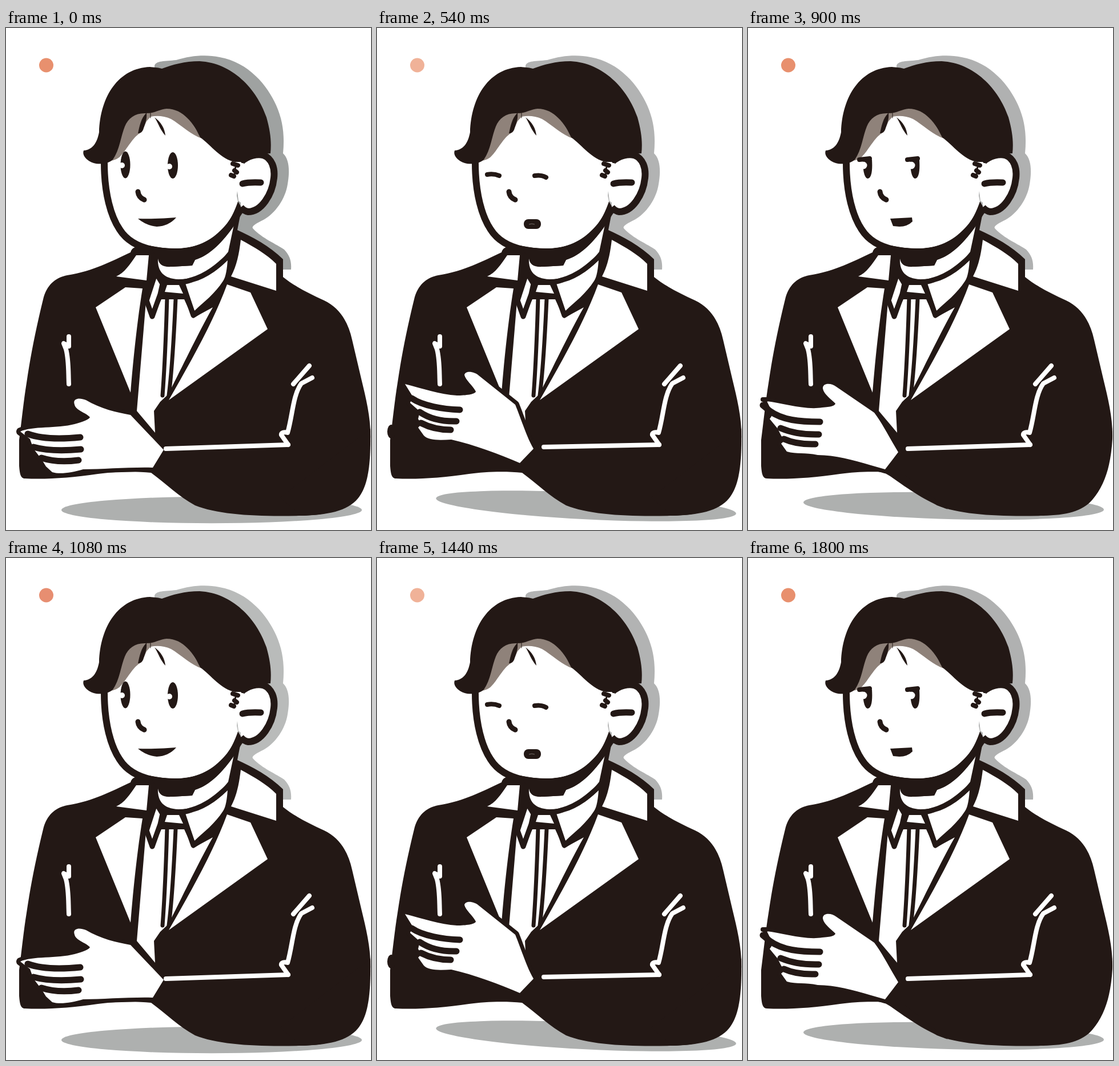
These frames come from a looping animation (639 px wide and 877 px high, 1980 ms). An HTML page:

```html
<!DOCTYPE html>
<html lang="en">
<head>
<meta charset="utf-8">
<title>Man with folded arms</title>
<style>
  html, body { margin: 0; width: 100%; height: 100%; overflow: hidden; background: #fff; }
  svg { display: block; width: 100%; height: 100%; }
  .k { fill: #231815; }
  .w { fill: #fff; }
  .l { fill: none; stroke: #231815; stroke-linecap: round; stroke-linejoin: round; }
  .c { fill: none; stroke: #fff; stroke-width: 8; stroke-linecap: round; stroke-linejoin: round; }
  .hand { fill: #fff; stroke: #231815; stroke-width: 14; stroke-linejoin: round; paint-order: stroke; }
  .pose, .mouth { display: none; }
</style>
</head>
<body>
<svg viewBox="0 0 639 877">
  <defs>
    <path id="elbow" class="k" d="M638 700C639 768 633 801 616 822C598 844 562 851 517 852L480 820Z"/>
  </defs>
  <circle id="dot" cx="70.500" cy="65" r="12.500"/>
  <ellipse id="ground" rx="263" ry="23.300" fill="#aeb0af"/>
  <path id="halo" d="M260 72V66C262 57 278 58 298 56C324 48 350 46 374 51C425 60 458 101 473 135C485 162 488 188 485 219C496 229 497 250 493 273C489 299 471 324 451 335C437 342 428 347 433 351C448 367 474 378 487 387C497 398 500 407 499 422H480L400 350Z"/>

  <!-- jacket -->
  <path class="k" d="M218 392C220 385 224 383 231 382L290 350L413 312L405 353C430 364 462 381 485 404V435C503 450 531 464 557 476C584 489 599 513 606 545L622 613C631 650 639 683 638 718C635 765 625 798 603 824C585 845 557 851 517 852C446 854 373 851 331 834C302 818 281 797 254 777C225 774 189 775 161 779C112 786 69 789 33 787C25 787 24 777 23 765V720C27 690 31 650 36 620C44 566 53 523 66 470C74 445 89 436 107 432C155 424 183 408 218 392Z"/>
  <g class="w">
    <path d="M228 397H250L246 441L193 434C207 428 217 413 228 397Z"/>
    <path d="M411 370C435 383 456 395 473 412V459L394 434C404 415 408 395 411 370Z"/>
    <path d="M157 488L209 453L239 455C230 510 223 575 218 637Z"/>
    <path d="M387 448L428 462L458 526L285 650C322 585 361 518 387 448Z"/>
    <path d="M245 478L256 508L272 474H312L327 507L362 488C338 530 307 595 284 640L270 653L259 669L261 707L229 669Z"/>
    <path d="M266 403C268 414 275 418 290 417L326 415L331 405C357 397 380 373 399 344L389 391C371 414 342 439 302 439C276 438 265 425 266 403Z"/>
    <path d="M314 446C345 440 370 425 388 405C387 420 385 435 380 442C365 465 347 478 330 494Z"/>
  </g>
  <path d="M262 427L274 447L270 465L256 504L246 476Z" fill="#fff" stroke="#231815" stroke-width="9" stroke-linejoin="round"/>
  <g class="l">
    <path d="M269 432C282 446 305 447 325 440C352 433 373 414 389 399M309 448L328 502L358 482" stroke-width="9"/>
    <path d="M276 466L311 468M282 471C280 540 278 590 274 642M297 473C294 540 291 595 285 642" stroke-width="7"/>
  </g>
  <path class="w" d="M282 449H303L310 464L278 461Z"/>
  <path class="c" d="M110 539V556L101 551L105 561C110 580 109 600 110 622M503 622L531 590M536 611L517 621C502 642 502 676 493 707C487 705 481 707 482 711L494 728"/>

  <!-- head -->
  <path class="w" d="M172 235C172 290 184 330 199 352C217 379 250 391 290 391C342 389 384 358 400 322L412 232L380 140H240Z"/>
  <path class="l" stroke-width="12" d="M172 235C172 290 184 330 199 352C216 379 250 390 290 391"/>
  <path class="k" d="M250 380C303 391 344 385 375 354C391 339 397 326 406 303L416 320L399 346C380 373 357 397 331 405L326 415L292 417C277 417 272 405 263 398Z"/>
  <path class="w" d="M250 379C303 391 344 385 375 354C391 339 398 326 406 303L395 250L240 250Z"/>
  <path d="M411 234C425 222 440 220 450 222C466 228 471 245 469 262C466 291 447 321 424 321C418 320 414 317 411 313" fill="#fff" stroke="#231815" stroke-width="12"/>
  <path class="w" d="M399 236H416V309L407 302Z"/>
  <path class="l" stroke-width="11" d="M414 272Q425 269 446 270"/>
  <path class="l" stroke-width="8" d="M397 237L406 240M400 249L404 252M394 257L399 259"/>
  <path class="l" stroke-width="3" d="M403 240L400 249M403 252L398 257"/>
  <path fill="#8f827a" d="M183 232C198 205 187 145 246 147L253 148C275 136 302 138 318 155L343 193C324 187 306 169 289 159C276 153 263 153 253 155L246 163L237 182C222 190 211 213 202 222Q196 230 183 232Z"/>
  <path class="k" d="M136 214C150 213 159 203 163 182C165 119 197 70 252 68C261 69 267 69 273 71C292 64 312 58 339 58C396 61 439 106 456 156C463 181 465 199 463 219L450 220C434 220 428 227 416 234H401C377 230 359 205 340 191C329 168 311 141 281 141C268 142 261 149 245 149C227 148 214 157 208 172C201 189 199 213 187 230C180 236 171 238 158 237C145 235 132 224 136 214Z"/>
  <path class="k" d="M246 148C236 158 234 171 231 184Q237 184 240 178C244 166 247 160 246 148ZM260 156C271 164 278 175 279 188C270 178 267 167 260 156Z"/>
  <path class="l" stroke-width="1" d="M253 148V157"/>
  <path class="l" stroke-width="9" d="M231 286Q232 296 242 300"/>

  <!-- mouths -->
  <path class="mouth k" d="M231 333Q265 334 298 331Q285 346 264 347Q245 345 231 333Z"/>
  <path class="mouth l" stroke-width="9" d="M238 334Q262 346 286 339"/>
  <g class="mouth">
    <rect class="k" x="257" y="334" width="30" height="17" rx="8"/>
    <path d="M266 343Q271 341 276 343" fill="none" stroke="#776e69" stroke-width="1"/>
  </g>
  <path class="mouth k" d="M249 333L287 331L288 338Q279 347 265 347L254 346Z"/>

  <!-- arms and eyes: low, middle, high -->
  <g class="pose">
    <use href="#elbow"/>
    <path class="hand" d="M120 658C116 647 128 645 140 650C165 665 195 672 218 676L276 737L257 768C215 767 170 771 135 771C115 777 94 780 81 776L70 766L62 753L48 735L42 718L25 705C45 695 90 700 120 692C135 688 145 684 147 680C140 672 122 668 120 658Z"/>
    <path class="l" stroke-width="11" d="M38 709Q70 721 130 715M48 732Q80 741 131 736M62 751Q90 760 127 755"/>
    <path class="c" d="M280 735L494 728"/>
    <g class="k"><ellipse cx="209" cy="239" rx="8.500" ry="23.500"/><ellipse cx="292" cy="240" rx="9" ry="23"/></g>
    <g class="w"><circle cx="203" cy="240" r="5"/><circle cx="286" cy="242" r="5"/></g>
  </g>
  <g class="pose">
    <path class="k" d="M222 774Q238 775 249 783C288 811 316 829 350 841L255 765Z"/>
    <path class="hand" d="M131 630C130 620 145 619 155 627L221 672C235 690 250 720 263 741L240 771C200 760 160 746 122 746C100 741 85 745 68 740L58 726L64 721L58 712L52 700L38 683L44 674L33 652C60 655 100 668 130 663C145 662 152 660 153 656C145 648 133 640 131 630Z"/>
    <path class="l" stroke-width="11" d="M26 659L38 669C60 685 90 688 126 688M57 699Q85 711 124 710M63 718Q85 728 118 727"/>
    <path class="l" stroke-width="8" d="M26 649H32"/>
    <path class="c" d="M280 735L494 728"/>
    <path class="k" d="M201 230H217Q219 263 209 263Q201 260 201 230ZM284 230H300Q302 263 292 263Q284 260 284 230Z"/>
    <g class="w"><circle cx="202" cy="240" r="6.500"/><circle cx="286" cy="240" r="6.500"/></g>
    <path class="l" stroke-width="8" d="M195 230L213 228M279 230L297 228"/>
  </g>
  <g class="pose">
    <use href="#elbow"/>
    <ellipse class="k" cx="25" cy="705" rx="7" ry="12"/>
    <path class="hand" d="M153 606C155 598 170 600 178 607L242 658C255 690 262 715 274 735L250 760C215 745 170 728 130 719C110 720 90 721 82 712L72 698L78 692L72 683L75 670L58 655L62 643L49 622C80 630 110 640 140 642C155 642 172 640 173 635C168 625 155 615 153 606Z"/>
    <path class="l" stroke-width="11" d="M61 647C80 660 115 666 145 667M75 671Q100 688 139 687M77 690Q100 702 129 702"/>
    <path class="c" d="M292 732L494 728"/>
    <path class="l" stroke-width="8" d="M193 256Q204 254 214 258M276 258Q288 256 296 261"/>
  </g>
</svg>
<script>
  const $ = id => document.getElementById(id);
  const all = name => [...document.querySelectorAll('.' + name)];
  const poses = all('pose'), mouths = all('mouth');

  // pose, mouth, halo colour, dot colour, ground x, y, tilt
  const start = [0, 0, '#9fa2a1', '#e8906e', 360, 842, 0];
  const cycle = [
    [0, 0, '#b9bbba', '#e78e71', 360, 842, 0],
    [1, 1, '#e1e1e1', '#e78c76', 360, 842, 0],
    [2, 2, '#b2b3b3', '#f0b298', 366, 835, 2.9],
    [2, 2, '#bcbebd', '#eca185', 364, 836, 2.3],
    [1, 3, '#b0b1b1', '#e8906e', 360, 835, 1.4]
  ];
  const steps = [start, ...cycle, ...cycle];
  const pick = (list, n) => list.forEach((el, i) => el.style.display = i === n ? 'inline' : 'none');

  function draw(now) {
    const [pose, mouth, halo, dot, x, y, tilt] = steps[Math.floor(now % 1980 / 180)];
    pick(poses, pose);
    pick(mouths, mouth);
    $('halo').setAttribute('fill', halo);
    $('dot').setAttribute('fill', dot);
    $('ground').setAttribute('transform', `translate(${x} ${y}) rotate(${tilt})`);
  }

  const t0 = performance.now();
  function tick() {
    draw(performance.now() - t0);
    requestAnimationFrame(tick);
  }
  tick();
</script>
</body>
</html>
```
